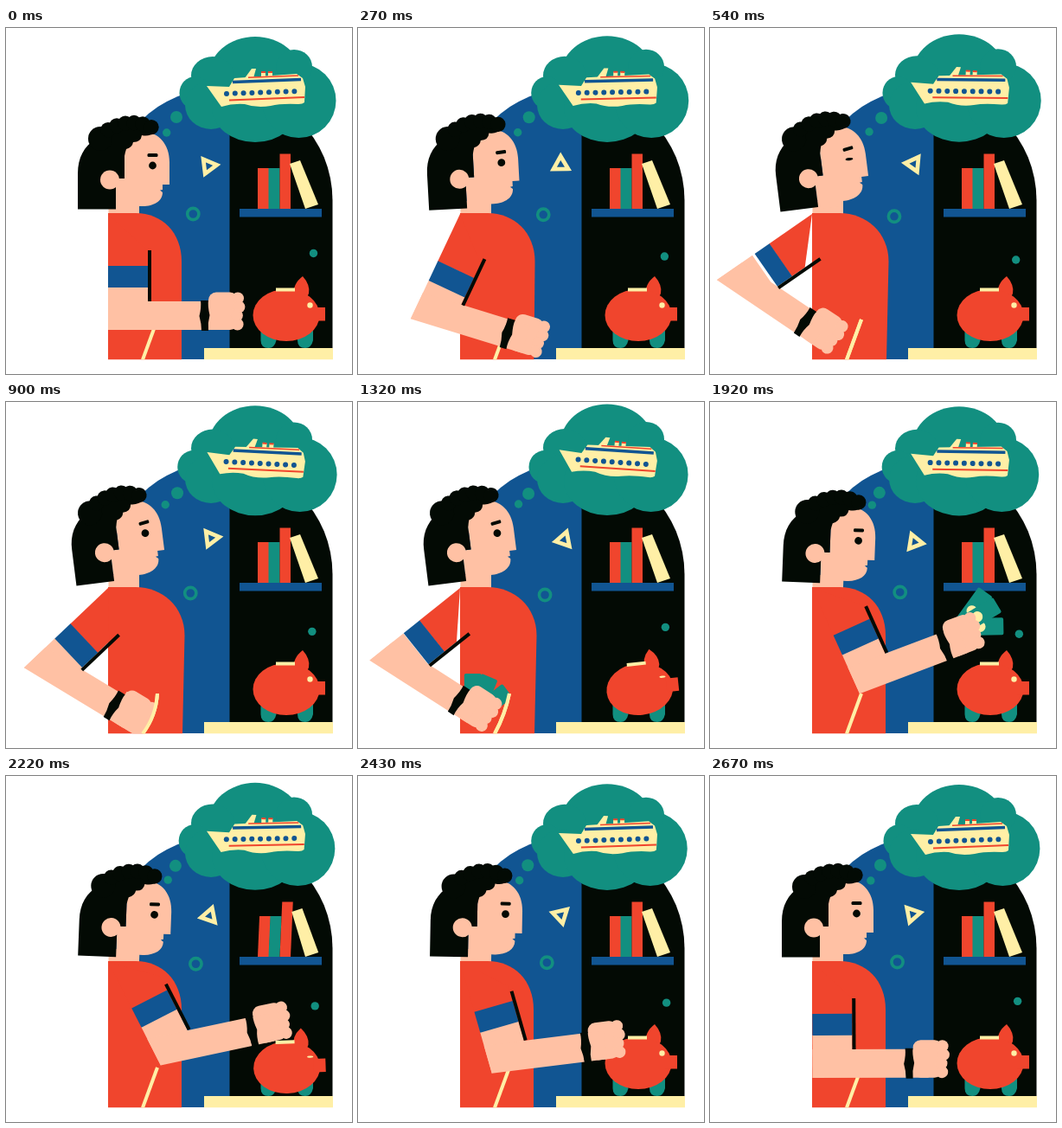
Write an HTML page with a canvas that moves like this. It is 400x400 px and loops after 2.7 s.

```html
<!DOCTYPE html>
<html lang="en">
<head>
<meta charset="utf-8">
<title>Saving for a cruise</title>
<style>
html, body { margin: 0; width: 100%; height: 100%; overflow: hidden; background: #fff; }
canvas { display: block; width: 400px; height: 400px; }
</style>
</head>
<body>
<canvas id="stage" width="400" height="400"></canvas>
<script>
const g = document.getElementById('stage').getContext('2d');
const LOOP = 2700, TAU = Math.PI * 2, RAD = Math.PI / 180;
const RED = '#f0452d', TEAL = '#128f80', BLUE = '#115592', BLACK = '#030a04',
      SKIN = '#ffc1a4', CREAM = '#ffefa6';

// Eased step from 0 to 1, and a step up followed by a step down.
const ramp = (t, from, to) => {
  const u = Math.min(1, Math.max(0, (t - from) / (to - from)));
  return u * u * (3 - 2 * u);
};
const pulse = (t, a, b, c, d) => ramp(t, a, b) - ramp(t, c, d);

function poseAt(t) {
  const dig = pulse(t, 620, 900, 1200, 1440);
  const lean = pulse(t, 60, 520, 1360, 1650);
  const look = pulse(t, 1500, 1720, 2230, 2620);
  const hit = pulse(t, 2100, 2220, 2220, 2400);
  const blink = time => Math.abs(t - time) < 75 ? .35 : 1;
  return {
    t, dig, lean, hit,
    upper: 56 * ramp(t, 0, 580) - 9.5 * dig - 83 * ramp(t, 1440, 1980) + 27 * ramp(t, 2220, 2700),
    fore: 34 * ramp(t, 0, 540) - 2.8 * dig - 60 * ramp(t, 1480, 2020)
      + 14 * ramp(t, 2050, 2220) + 12 * ramp(t, 2220, 2700),
    tilt: -7.2 * lean + 2.2 * look,
    pigTilt: -6 * pulse(t, 1140, 1320, 1320, 1500) + 3 * pulse(t, 1560, 1680, 1680, 1900) - 2 * hit,
    lid: blink(540),
    pigLid: Math.min(blink(1320), blink(2220)),
    inPocket: t >= 540 && t < 1440
  };
}

function fill(color, d) {
  g.fillStyle = color;
  g.fill(new Path2D(d));
}
function line(color, width, d) {
  g.strokeStyle = color;
  g.lineWidth = width;
  g.stroke(new Path2D(d));
}
function rect(color, x, y, w, h, r = 0) {
  g.fillStyle = color;
  g.beginPath();
  g.roundRect(x, y, w, h, r);
  g.fill();
}
function oval(color, x, y, rx, ry = rx) {
  g.fillStyle = color;
  g.beginPath();
  g.ellipse(x, y, rx, ry, 0, 0, TAU);
  g.fill();
}
function group(draw, x = 0, y = 0, deg = 0, px = 0, py = 0) {
  g.save();
  g.translate(x + px, y + py);
  g.rotate(deg * RAD);
  g.translate(-px, -py);
  draw();
  g.restore();
}

function room({ hit }) {
  g.save();
  g.clip(new Path2D('M118 383V199A129.7 129.7 0 0 1 377.5 199V383Z'));
  rect(BLUE, 124, 60, 135, 323.5);
  rect(BLACK, 258.5, 60, 120, 323.5);
  g.restore();
  rect(BLUE, 270, 209, 95, 9.5);

  const skew = Math.tan(2.5 * hit * RAD);
  g.save();
  g.transform(1, 0, -skew, 1, 209 * skew, 0);
  rect(RED, 291, 162, 13, 47);
  rect(TEAL, 303.5, 162, 13, 47);
  rect(RED, 316.5, 145.5, 12.5, 63.5);
  fill(CREAM, 'M328 157L340 153L361 204L346 209Z');
  g.restore();
  rect(CREAM, 229, 370, 149, 13.5);
}

function floaters(s, c, a) {
  oval(TEAL, 197 + 1.2 * s, 104.5 - 1.5 * c, 7);
  oval(TEAL, 185.7 - 1.7 * s, 119.5 + 1.5 * c, 4.7);
  oval(TEAL, 355.5 - 1.9 * s, 264.3 - 4 * Math.cos(2 * a + .25), 4.7);
  g.strokeStyle = TEAL;
  g.lineWidth = 3.6;
  g.beginPath();
  g.arc(216.3 - 3.5 * s, 219 - 4 * c, 6.6, 0, TAU);
  g.stroke();
  group(() => line(CREAM, 4.7, 'M9.8 0L-4.9 8.5V-8.5Z'),
    236 - 2 * c, 159.5 - 2.5 * s, a / RAD - 7);
}

function ship() {
  fill(CREAM, 'M232 67L258 68L264 58L336 53L343 58L346 68L345 86Q343 88 338 88Q318 87 306 90Q290 93 276 88Q262 87 249 91Z');
  fill(CREAM, 'M276 58L284 47H289L286 58Z');
  for (const x of [295, 303]) {
    rect(CREAM, x, 51, 5, 5);
    rect(RED, x, 50, 5, 2);
  }
  line(RED, 1.5, 'M280 57.3L338 55');
  line(BLUE, 3.5, 'M262 62.5L341 59.5');
  line(RED, 2, 'M258 83.5L345 80');
  for (let i = 0; i < 9; i++) oval(BLUE, 255 + i * 9.8, 76 - i * .35, 3);
}

function cloud(s, c, a) {
  oval(TEAL, 288, 52.2 + 3.8 * c, 54, 46);
  oval(TEAL, 239, 54 + c, 25, 22);
  oval(TEAL, 219 + 1.5 * (c - 1), 75, 18.5, 19);
  oval(TEAL, 237, 89, 30, 28);
  oval(TEAL, 288, 91.5 + .5 * c, 50, 40);
  oval(TEAL, 338.5 + 1.3 * s, 84, 43);
  oval(TEAL, 333, 44 + c, 21, 20);
  group(ship, 0, s, 3 - 3 * Math.cos(a + .2), 346, 67);
}

function pig({ pigTilt, pigLid, hit }) {
  for (const x of [303.5, 346]) fill(TEAL, `M${x - 9} 350H${x + 9}V361Q${x + 7} 370 ${x} 370Q${x - 9} 370 ${x - 9} 361Z`);
  group(() => {
    group(() => fill(RED, 'M333 309Q331 296 343 287Q352 297 350 307L346 315Z'),
      0, 0, 1.5 * pigTilt, 342, 310);
    oval(RED, 324, 332, 38.5, 30);
    rect(RED, 355, 323, 14, 15.5);
    rect(CREAM, 312, 300.5, 22, 4);
    oval(CREAM, 351.5, 320.5, 3.8 - .6 * pigLid, 3.2 * pigLid);
  }, -.3 * pigTilt, 5 * hit, pigTilt, 324, 332);
}

function head({ lid, lean }) {
  fill(SKIN, 'M127 174H137V120H158C177 120 189 135 189 155V181H181V187L178 187.5L181 190C181 200 171 206 158 206H154V212H127Z');
  fill(BLACK, 'M83 209.5V168C83 150 90 137 104 128L130 108H165L172 120Q166 126 157 124Q156 132 147 132Q146 138 139 140Q138 143 137 148V174H127V209.5Z');
  oval(BLACK, 109, 128, 14);
  for (let x = 118; x <= 168; x += 10) oval(BLACK, x, 109.5 + (x - 146) ** 2 / 95, 8.7);
  oval(SKIN, 120, 175.5, 11);
  oval(BLACK, 169.5, 159, 4.4, 4.4 * lid);
  group(() => rect(BLACK, 163.5, 145, 12, 4, 1.5), 0, 0, -9 * lean, 169, 147);
}

function body(pose) {
  const { lean, tilt } = pose, side = 203 + 3.5 * lean;
  rect(SKIN, 118.5, 200, 35.5, 16);
  fill(RED, `M118 214H150C180 214 ${side} 236 ${side} 270L${203 + lean} 383.5H118Z`);
  group(() => head(pose), -1.5 * lean, -3.5 * lean, tilt, 135, 213);
}

const pocketEdge = ({ dig }) => `M175 337Q${166.5 + 7 * dig} ${360 + 3 * dig} 158 383.5`;

// Runs draw with everything right of the pocket edge hidden.
function behindPocket(pose, draw) {
  g.save();
  if (pose.inPocket) g.clip(new Path2D(pocketEdge(pose) + 'H0V200H175Z'));
  draw();
  g.restore();
}

function atElbow({ upper, fore }, draw) {
  const a = upper * RAD;
  group(draw, 118 - 134 * Math.sin(a), 215 + 134 * Math.cos(a), fore);
}

function bills(pose) {
  const { t } = pose;
  if (t < 1200 || t > 2180) return;
  const hidden = 24 * (1 - ramp(t, 1260, 1560)), turn = 165 * ramp(t, 1720, 2100);
  behindPocket(pose, () => atElbow(pose, () => {
    for (const deg of [20, -33, -10]) group(() => {
      rect(TEAL, -10, -50, 20, 46, 2);
      oval(CREAM, 0, -23, 6.3);
    }, 136, -31 + hidden, deg + turn);
  }));
}

function hand(deep) {
  rect(SKIN, 116, -43.5, 34, 43.5, 9);
  rect(SKIN, 114, -33, 20, 33);
  for (let i = 0; i < 4; i++) oval(SKIN, 150 + 1.5 * Math.sin(2 * i), -36.5 + 10 * i, 7);
  if (deep) rect(SKIN, 116, -38, 58, 38);
}

function arm(pose) {
  const { upper, fore, dig } = pose;
  const bend = (fore - upper) * RAD;
  const inner = 134 - 33 / Math.cos(bend) + 46 * Math.tan(bend);
  group(() => {
    fill(SKIN, `M0 84H46V${inner + 1}L0 134Z`);
    fill(RED, 'M0 0L46 42V60.5H0Z');
    rect(BLUE, 0, 60, 46, Math.min(25, inner - 60));
  }, 118, 215, upper);

  behindPocket(pose, () => atElbow(pose, () => {
    fill(SKIN, `M0 0L${-33 * Math.tan(bend)} -33H108V0Z`);
    hand(dig > .5);
    fill(BLACK, 'M107 -34H116Q115 -28 117.5 -17Q115 -8 116 1H108Q108 -7 105.5 -16Q108 -26 107 -34Z');
  }));
  group(() => rect(BLACK, 46, inner - 59, 4, 59), 118, 215, upper);
  if (pose.inPocket) line(CREAM, 4, pocketEdge(pose));
}

function draw(t) {
  const a = TAU * t / LOOP, s = Math.sin(a), c = Math.cos(a), pose = poseAt(t);
  g.fillStyle = '#fff';
  g.fillRect(0, 0, 400, 400);
  g.save();
  g.beginPath();
  g.rect(0, 0, 400, 383.5);
  g.clip();
  room(pose);
  floaters(s, c, a);
  cloud(s, c, a);
  body(pose);
  line(CREAM, 4, pocketEdge(pose));
  bills(pose);
  pig(pose);
  arm(pose);
  g.restore();
}

function frame() {
  draw(performance.now() % LOOP);
  requestAnimationFrame(frame);
}
frame();
</script>
</body>
</html>
```
